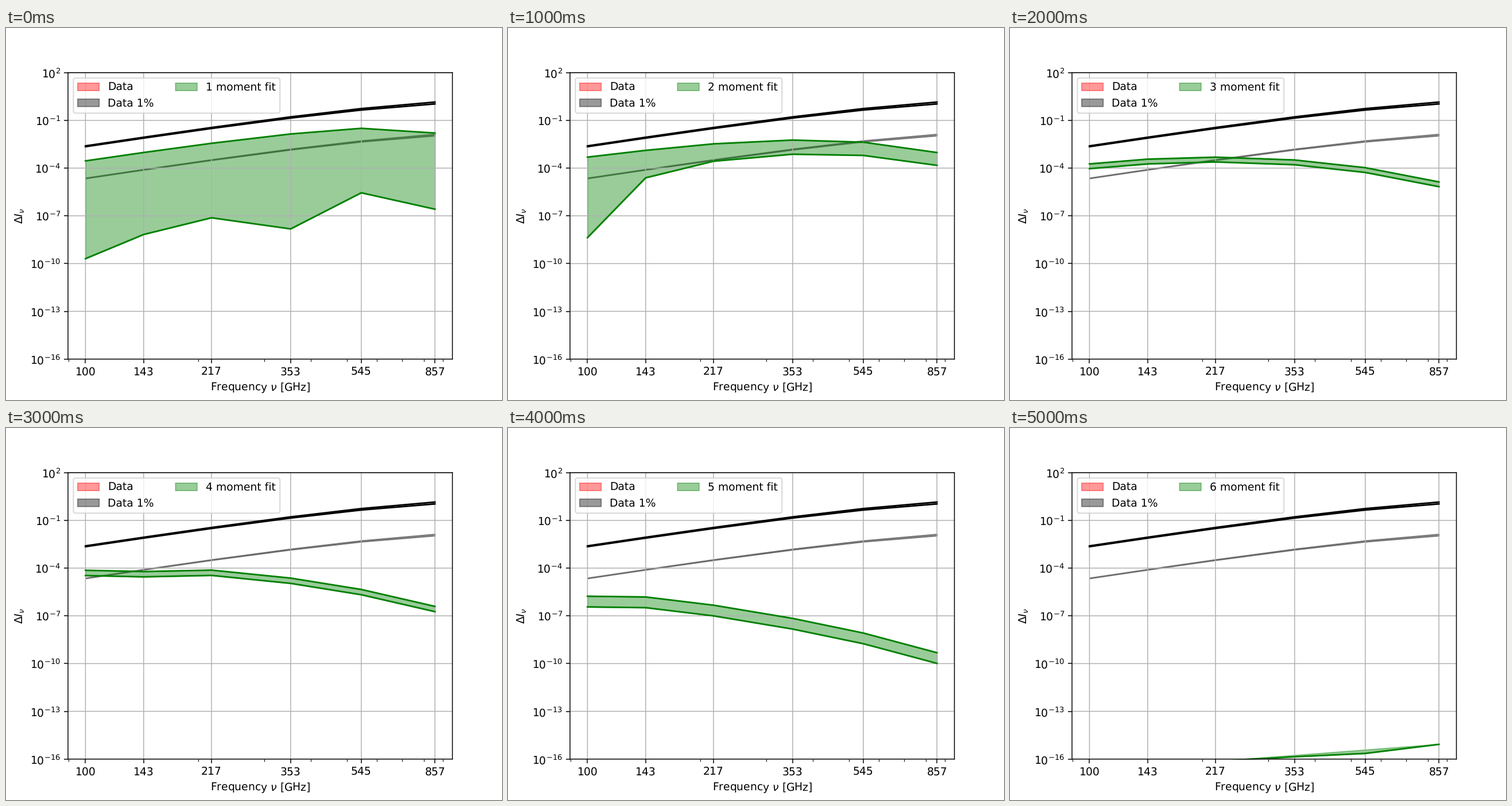
Animation, 864 px wide and 648 px high, one loop 6000 ms. Source, as a matplotlib script:

```python
import numpy as np
import matplotlib.pyplot as plt
from matplotlib.animation import FuncAnimation
from matplotlib.patches import Patch
from matplotlib.ticker import LogLocator, NullFormatter, NullLocator

plt.rcParams.update({"path.snap": False, "text.hinting": "none"})

FREQS = np.array([100, 143, 217, 353, 545, 857])
u = np.log10(FREQS / 100)
span = (FREQS - 100) / 757

# All spectra below are log10 intensities.
# Dust emission: a power law times a Planck cut-off.
dust = -2.628 + 4.714 * u - np.log10(np.expm1(0.003581 * FREQS) / np.expm1(0.3581))
spread = 0.025 + 0.033 * span

# Shape of what a polynomial fit leaves over at the six frequencies
distances = np.abs(u[:, None] - u) + np.eye(6)
leftover = -dust - np.log10(distances.prod(axis=1))


def residual_bands():
    """(top, bottom) of the residuals for one to six moments."""
    top = dust + np.log10(0.121 - 0.108 * span**1.2)
    yield top, np.array([-9.69, -8.17, -7.12, -7.82, -5.55, -6.58])

    top = dust - 0.68 - 0.69 * u - 2.2 * u**3
    yield top, top - 0.79 - 4.27 * np.exp(-5.8 * u**0.72)

    top = dust - 1.106 - 1.05 * u - 3.3 * u**2
    yield top, top - 0.30

    top = leftover - 0.35 * u + np.log10(4e-8 * np.abs(u - 0.085))
    yield top, top - 0.332

    top = leftover - 0.65 * u - 10.10
    yield top, top - 0.672

    top = -15.054 + 1.8 * (u - u[-1])
    yield top, top - 0.26 * np.exp(-((u - 0.69) / 0.15) ** 2)


fig, ax = plt.subplots(figsize=(6.4, 4.8), dpi=135)
ax.set_xscale("log")
ax.set_yscale("log")


def band(low, high, color):
    return ax.fill_between(FREQS, 10.0**low, 10.0**high, color=color, alpha=0.4)


def line(values, color):
    return ax.plot(FREQS, 10.0**values, color=color)[0]


line(dust - spread, "black")
line(dust + spread, "black")
band(dust - spread - 2, dust + spread - 2, "black")

fits = []
for top, bottom in residual_bands():
    fits.append([band(bottom, top, "green"), line(bottom, "green"), line(top, "green")])
fits[-1].pop().remove()  # the exact fit keeps only its lower line

ax.set_xlim(100 * 8.57**-0.05, 857 * 8.57**0.05)
ax.set_ylim(1e-16, 1e2)
ax.set_xticks(FREQS, [str(f) for f in FREQS])
ax.xaxis.set_minor_locator(LogLocator(subs=range(2, 10), numticks=20))
ax.xaxis.set_minor_formatter(NullFormatter())
ax.set_yticks(10.0 ** np.arange(-16, 3, 3))
ax.yaxis.set_minor_locator(NullLocator())
ax.set_xlabel(r"Frequency $\nu$ [GHz]")
ax.set_ylabel(r"$\Delta I_\nu$")
ax.grid(True)

keys = [("red", "Data"), ("black", "Data 1%"), ("green", "1 moment fit")]
legend = ax.legend(handles=[Patch(color=c, alpha=0.4, label=t) for c, t in keys],
                   loc="upper left", ncol=2)
fit_label = legend.get_texts()[2]


def update(step):
    for i, parts in enumerate(fits):
        for part in parts:
            part.set_visible(i == step)
    fit_label.set_text(f"{step + 1} moment fit")
    return [fit_label]


anim = FuncAnimation(fig, update, frames=6, interval=1000,
                     init_func=lambda: update(0), repeat=True, repeat_delay=0)
plt.show()
```
